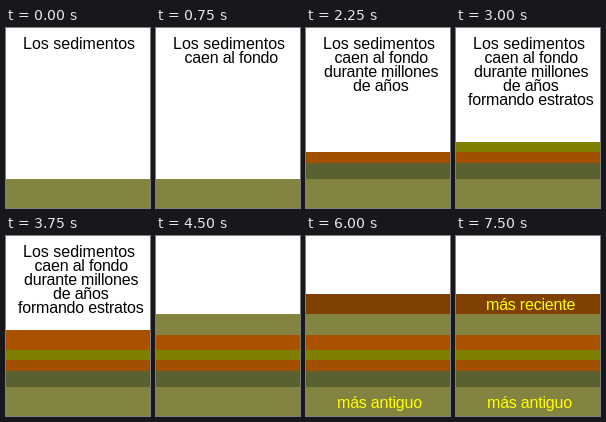
These frames come from a looping animation (144x180 px, 8 s). An HTML page:

```html
<!DOCTYPE html>
<html lang="es">
<head>
<meta charset="utf-8">
<style>
html, body { margin: 0; width: 100%; height: 100%; overflow: hidden; background: #fff; }
svg { display: block; width: 100vw; height: 100vh; }
text { font: 16px "Liberation Sans", Arial, sans-serif; letter-spacing: -0.2px; }
</style>
</head>
<body>
<svg id="stage" viewBox="0 0 144 180"></svg>
<script>
const LOOP = 8000;
const STEP = 750;
const stage = document.getElementById("stage");
const parts = [];

function add(tag, attrs, from, to = LOOP) {
  const node = document.createElementNS("http://www.w3.org/2000/svg", tag);
  for (const key in attrs) node.setAttribute(key, attrs[key]);
  stage.append(node);
  parts.push({ node, from, to });
  return node;
}

function layer(top, bottom, fill, step) {
  add("rect", { x: 0, y: top, width: 144, height: bottom - top, fill }, step * STEP);
}

function label(words, x, y, fill, from, to, spacing) {
  const node = add("text", { x, y, fill }, from, to);
  node.textContent = words;
  if (spacing !== undefined) node.style.letterSpacing = spacing;
}

// Strata in the order they settle
layer(151, 180, "#838342", 0);
layer(135, 151, "#5b6031", 2);
layer(124, 135, "#a05000", 3);
layer(114, 124, "#808000", 4);
layer(94, 114, "#a85200", 5);
layer(78, 99, "#838342", 6);
layer(58, 78, "#804000", 7);

const caption = [
  ["Los sedimentos", 17, 0],
  ["caen al fondo", 28.5],
  ["durante millones", 18],
  ["de años", 47],
  ["formando estratos", 12]
];
caption.forEach(([words, x, spacing], i) =>
  label(words, x, 21 + 14 * i, "#000", i * STEP, 6 * STEP, spacing));

label("más antiguo", 31, 172, "#ff0", 8 * STEP);
label("más reciente", 30, 74, "#ff0", 10 * STEP);

function draw() {
  const t = performance.now() % LOOP;
  for (const { node, from, to } of parts)
    node.style.display = t >= from && t < to ? "" : "none";
  requestAnimationFrame(draw);
}
draw();
</script>
</body>
</html>
```
